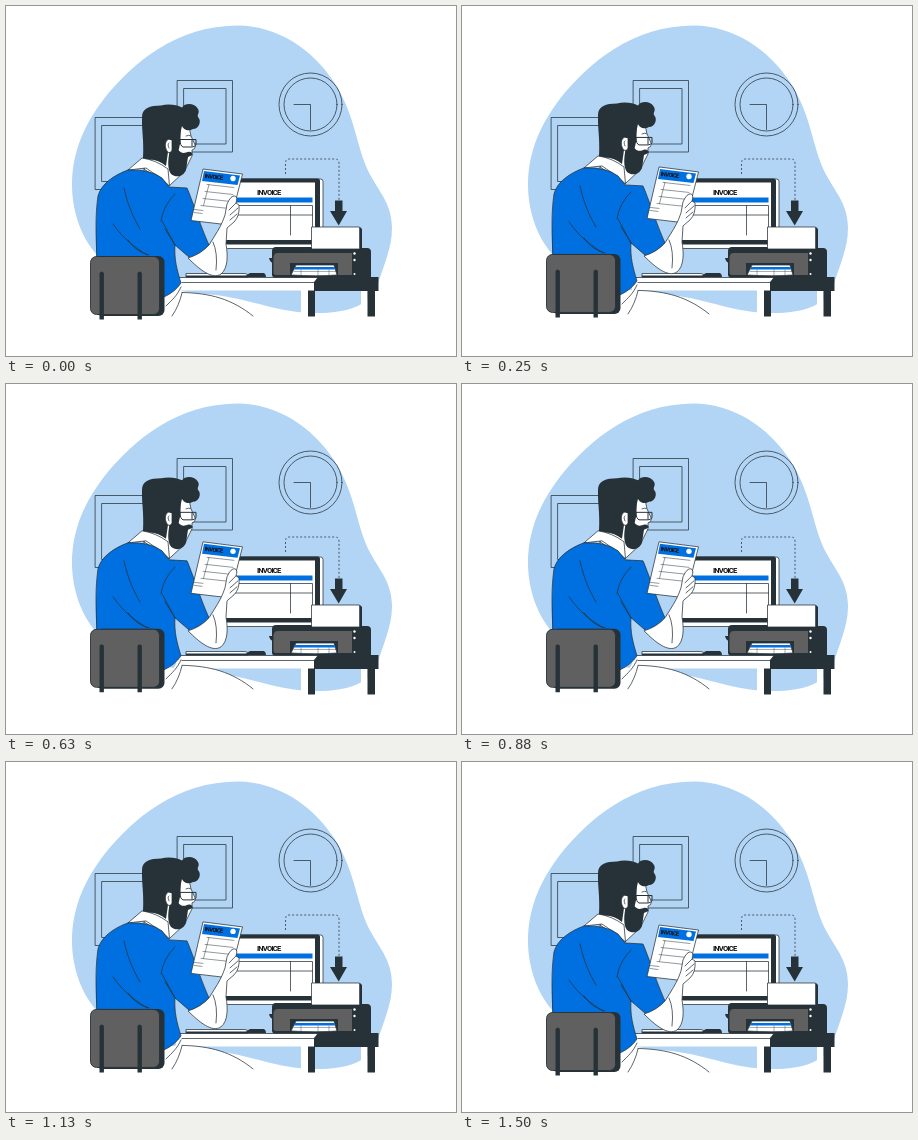
An HTML page that plays this animation: 450 px wide and 350 px high, repeating every 1.54 s.

```html
<!DOCTYPE html>
<html lang="en">
<head>
<meta charset="utf-8">
<title>Invoice printing</title>
<style>
  html, body { margin: 0; width: 100%; height: 100%; overflow: hidden; background: #fff; }
  svg { display: block; width: 100vw; height: 100vh; }
  .ln { fill: none; stroke: #263238; stroke-width: .75; stroke-linecap: round; stroke-linejoin: round; }
  .paper { fill: #fff; stroke: #263238; stroke-width: .75; stroke-linejoin: round; }
  .white { fill: #fff; }
  .dark { fill: #263238; }
  .blue { fill: #0070e0; }
  .grey { fill: #606060; }
  .sky { fill: #b2d4f5; }
  text { font-family: Roboto, "Liberation Sans", sans-serif; font-weight: 600; fill: #111; }
</style>
</head>
<body>
<svg viewBox="0 0 450 350">
  <path class="sky" d="M232 19.500C272 20 306 43 328 76C346 104 349 129 358 155C367 181 386 193 386 222C386 243 377 260 371 281C363 300 340 307.500 308 307C270 306 248 294 210 289C160 285 114 276 91 249C74 230 66 203 66 179C66 144 80 116 99 91.500C128 56 171 19.500 232 19.500Z"/>

  <g class="ln">
    <path d="M171.500 74.500h55v71.500h-55zM178 82.500h42v55.500h-42zM89.500 111.500h55v72h-55zM96 119.500h42v56h-42z"/>
    <circle cx="304.500" cy="98.500" r="31.500"/>
    <circle cx="304.500" cy="98.500" r="26.500"/>
    <path d="M288 98.500h16.500v25"/>
    <path stroke-dasharray="2 2" stroke-linecap="butt" d="M279.500 168V157q0-4 4-4h45.500q4 0 4 4v38"/>
  </g>
  <path class="dark" d="M329 194.500h7.500V205h4.500l-8.300 14.500L324 205h5z"/>

  <!-- monitor -->
  <rect class="paper" x="219" y="173" width="98" height="69.500" rx="2.500"/>
  <rect class="dark" x="219" y="172.500" width="95" height="66" rx="2.500"/>
  <rect class="white" x="219" y="176.500" width="90" height="57.500"/>
  <rect class="blue" x="226" y="191.500" width="80.500" height="5"/>
  <path class="ln" d="M226 199.500h80.500V229M226 209h80.500M284.500 199.500V229"/>
  <text x="262.700" y="188.700" font-size="7.600" text-anchor="middle" letter-spacing="-.8">INVOICE</text>

  <!-- desk -->
  <path class="white" d="M295 284h7v26.500h-7zM355 284h6.500v26.500H355z"/>
  <path class="dark" d="M302 284h7v26.500h-7zM361.500 284h7.500v26.500h-7.500z"/>
  <path class="white" d="M170 271.500h143l-5 13H170z"/>
  <path class="ln" d="M170 271.500h142M176 276.500h134"/>
  <path class="dark" d="M312 271h60.500v14H308v-9z"/>
  <path class="paper" d="M180 267.500h58q4 0 4 2v1.500h-62z"/>
  <path class="dark" d="M180 269.500h60l4-2.500h14q2 1 2 4h-80z"/>

  <!-- printer -->
  <path class="paper" d="M305.500 221h48v22h-48z"/>
  <path class="dark" d="M263 252h5v5q-4 0-5-5zM270 241h35l1 2h48v-22l2 2v19h5q4 0 4 4v25.500h-96q-3 0-3-3V245q0-4 4-4z"/>
  <path class="grey" d="M272 247h74v22h-14v-12h-48v12h-14q-2.500 0-2.500-2.500V252q0-5 4.500-5z"/>
  <path class="paper" d="M290 259h38l3 10q-20 1.500-46 0z"/>
  <path class="blue" d="M289 261h39.500l.5 2.500H288z"/>
  <path class="ln" d="M288 265.500h42M295 264v5M312 264v5M323 264v5" style="stroke-width:.4"/>
  <g class="white"><circle cx="348.500" cy="247.500" r="1.200"/><circle cx="348.500" cy="254" r="1.200"/><circle cx="348.500" cy="268" r="1"/></g>

  <g id="man">
    <!-- trousers -->
    <path class="white" d="M173 280L176 286.500C204 287 226 293 247 310H156z"/>
    <path class="ln" d="M176 286.500C204 287 226 293 247 310M176 287C174 295 171 303 166 310M175 281C171 290 166 294 160 300"/>

    <!-- face and hair -->
    <path class="paper" d="M171 117L183 121L185 130L189.500 140Q189 143.500 186 144L186 150L178 166L163 180L138 163L150 145L163 125z"/>
    <path class="dark" d="M136 111C136 102 144 99.500 155 99.500C163 97.500 171 99 176 101.500C179 96.500 189 97 192 103C194 107 191 108 192 111C196 115 193 123 187 123C182 126 177 123 176 120C174 126 175 132 174 138C173 143 172 146 171 150L165 149L162 146L160 160C153 154 144 152 136.500 155C139 142 135.500 126 136 111Z"/>
    <path class="dark" d="M164 144L169 138C172 145 175 148 180 146.500C184 144.500 187 146.500 186.500 149L182 151L180 164C177 171 170 172 165 168C161 163 162 152 164 144Z"/>
    <path class="paper" d="M166 134C161 131 158 137 160 143C162 148 165 147 166 144z"/>
    <path class="ln" d="M163 137q-2 1 0 5M180 130q3-1.500 4.500-.3M177 149.500q4-2.500 6-1"/>
    <path class="ln" d="M164 133.500h26v5q-1 2.500-4 2.500h-9q-3-1-3-7.500M186 134v6" style="stroke-width:1"/>

    <!-- shirt -->
    <path class="paper" d="M122 164L136 152Q150 154 162 163L163.500 180L156 173L140 162z"/>
    <path class="blue" d="M122 164Q144 163 156 172L163 181L181 182C186 193 194 219 203 239Q195 248 184 252L169 239C168 253 171 264 175 277Q169 286 158 291L91 270C90 242 89 214 92 190C95 178 108 169 122 164Z"/>
    <path class="ln" d="M122 164Q144 163 156 172L163 181L181 182C186 193 194 219 203 239Q195 248 184 252L169 239C168 253 171 264 175 277Q169 286 158 291M91 255C90 230 89 210 92 190C95 178 108 169 122 164M118 182C122 200 127 211 134 223M107 218C118 234 130 242 141 249M122 234Q130 246 143 249M169 188Q157 200 155 215M156 215L169 239M169 239L159 223"/>

    <!-- sheet -->
    <path class="paper" d="M197 163L236.500 168L223.500 219L185 214.500z"/>
    <path class="blue" d="M198 165L234 169.500L231.500 179L196 175z"/>
    <circle cx="227" cy="172.500" r="2.700" class="white"/>
    <text x="198.500" y="172" font-size="5.800" letter-spacing="-.6" transform="rotate(6 198.500 172)">INVOICE</text>
    <path class="ln" d="M201 178.500l27 3M199 185.500l28 3M197 192.500l28 3M195 199.500l28 3M203 178.500l-5.500 21M188 203.500l9 1M188 206.500l8 1" style="stroke-width:.5"/>

    <!-- arm and hand -->
    <path class="paper" d="M203 239L208 231C213 223 216 218 219 209L221 198Q225 189 229 190Q232 191 230 197L233 199Q234 210 228 216L221 222L220 238C222 250 222 262 215 268C206 274 193 263 182 252Q195 248 203 239z"/>
    <path class="ln" d="M230 197L223 204M232 202L224 209M231 208L224 214M207 236Q212 247 210 264"/>

    <!-- chair -->
    <rect class="dark" x="90" y="250" width="68.500" height="60" rx="6"/>
    <rect class="grey" x="84.500" y="250.500" width="69" height="58" rx="6" stroke="#263238" stroke-width=".9"/>
    <path class="dark" d="M93.500 267q2.200-3 4.400 0v46.500h-4.400zM131.500 267q2.200-3 4.400 0v46.500h-4.400z"/>
  </g>
</svg>
<script>
  const man = document.getElementById("man");
  const LOOP = 1540, FPS = 24, HALF = 750, RISE = 6.2;

  function draw(now) {
    const step = Math.floor((now % LOOP + 2) * FPS / 1000);
    const t = step * 1000 / FPS;
    const lift = RISE * Math.max(0, 1 - Math.abs(t - HALF) / HALF);
    man.setAttribute("transform", `translate(0 ${-lift})`);
  }

  const start = performance.now();
  function tick() {
    draw(performance.now() - start);
    requestAnimationFrame(tick);
  }
  tick();
</script>
</body>
</html>
```
